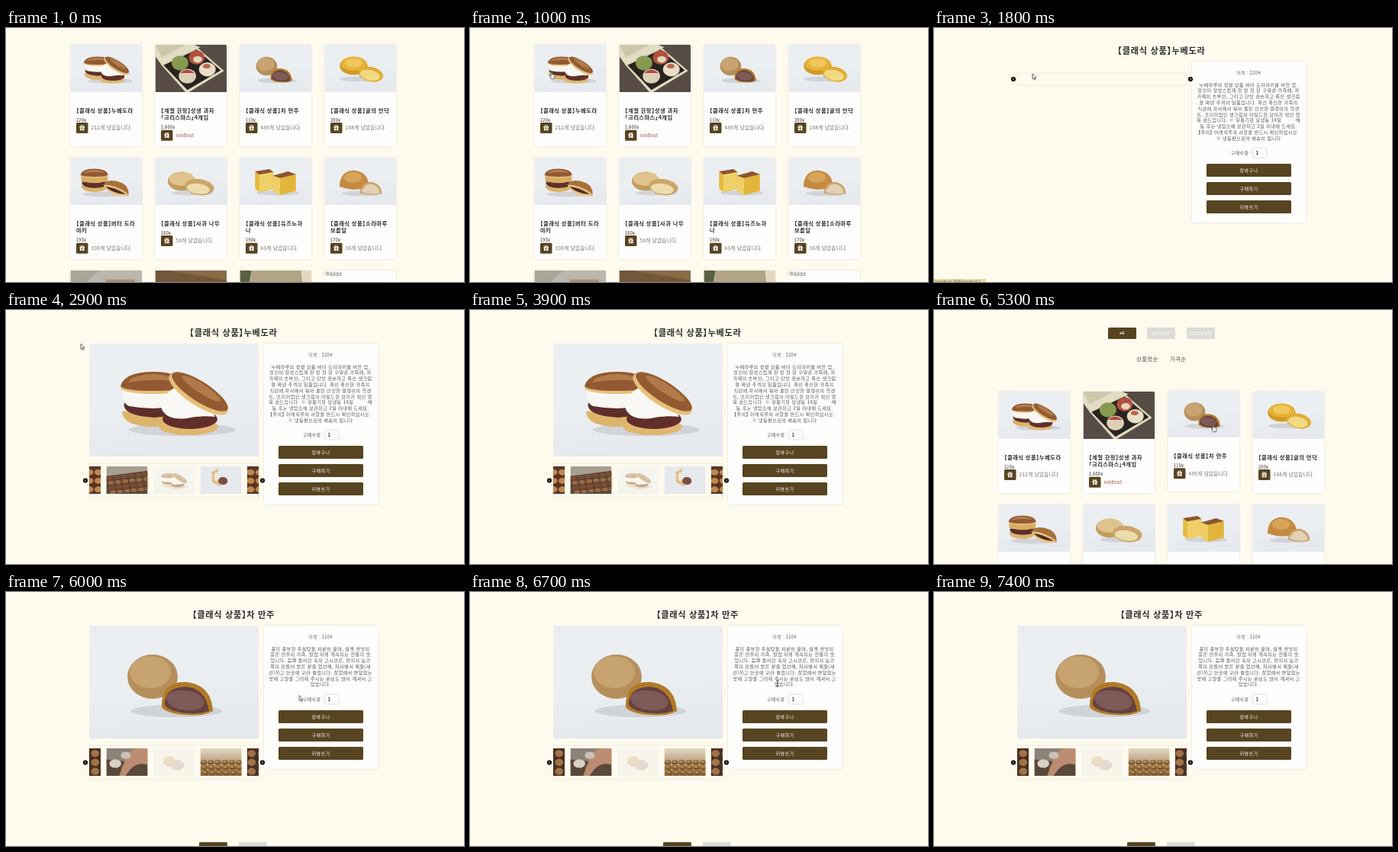
These frames come from a looping animation (600x333 px, 7500 ms). An HTML page:

```html
<!DOCTYPE html>
<html lang="ko">
<head>
<meta charset="utf-8">
<title>과자 상점</title>
<style>
html, body { margin: 0; width: 100%; height: 100%; overflow: hidden; background: #fefaee; }
svg { display: block; }
#stage { width: 600px; height: 333px; }
text {
  font-family: "Noto Sans CJK KR", "Noto Sans KR", "Noto Sans CJK JP", sans-serif;
  font-feature-settings: "halt"; letter-spacing: .055em; white-space: pre; fill: #555350;
}
.mid { text-anchor: middle; }
.bold { font-weight: 700; fill: #2f2e2c; }
.white { fill: #fff; }
.card, .panel { fill: #fffefd; filter: drop-shadow(0 .6px 1.2px #0002); }
.step { animation: 7.5s step-end infinite; }
.move { animation: 7.5s linear infinite; }
#list { animation-name: list; }
#detail0 { animation-name: first; }
#detail1 { animation-name: second; }
#empty0 { animation-name: firstEmpty; }
#empty1 { animation-name: secondEmpty; }
#full0 { animation-name: firstFull; }
#full1 { animation-name: secondFull; }
#status { animation-name: status; }
#card0 { animation-name: lift0; }
#card2 { animation-name: lift2; }
#cursor { animation-name: path; }
#arrow { animation-name: arrow; }
#hand { animation-name: hand; }
#beam { animation-name: beam; }

@keyframes list {
  0% { visibility: visible; transform: none; }
  22.66% { visibility: hidden; transform: none; }
  53.33% { visibility: visible; transform: translateY(85px); }
  73.33%, 100% { visibility: hidden; transform: translateY(85px); }
}
@keyframes first { 0% { visibility: hidden; } 22.66% { visibility: visible; } 53.33%, 100% { visibility: hidden; } }
@keyframes firstEmpty { 0% { visibility: hidden; } 22.66% { visibility: visible; } 27.99%, 100% { visibility: hidden; } }
@keyframes firstFull { 0% { visibility: hidden; } 27.99% { visibility: visible; } 53.33%, 100% { visibility: hidden; } }
@keyframes second { 0% { visibility: hidden; } 73.33%, 100% { visibility: visible; } }
@keyframes secondEmpty { 0% { visibility: hidden; } 73.33% { visibility: visible; } 77.33%, 100% { visibility: hidden; } }
@keyframes secondFull { 0% { visibility: hidden; } 77.33%, 100% { visibility: visible; } }
@keyframes status {
  0% { visibility: hidden; } 15.99% { visibility: visible; } 26.66% { visibility: hidden; }
  71.99% { visibility: visible; } 74.66%, 100% { visibility: hidden; }
}
@keyframes lift0 { 0%, 13.34% { transform: none; } 17.3%, 30% { transform: translateY(-5px); } 31%, 100% { transform: none; } }
@keyframes lift2 { 0%, 69.33% { transform: none; } 73.33%, 80% { transform: translateY(-5px); } 81%, 100% { transform: none; } }
@keyframes path {
  0%, 2% { transform: translate(300px, -14px); }
  13.2%, 14.5% { transform: translate(107px, 57.5px); }
  24%, 34.7% { transform: translate(129px, 60px); }
  43.3%, 44% { transform: translate(62px, 26px); }
  44.01%, 55.98% { transform: translate(-30px, 24px); }
  56% { transform: translate(76px, 24px); }
  69.33%, 73.33% { transform: translate(366px, 150.5px); }
  87%, 90% { transform: translate(403px, 120px); }
  94.7%, 100% { transform: translate(-20px, 140px); }
}
@keyframes arrow {
  0% { visibility: visible; } 12% { visibility: hidden; } 22.66% { visibility: visible; }
  68.5% { visibility: hidden; } 74% { visibility: visible; } 85% { visibility: hidden; } 91%, 100% { visibility: visible; }
}
@keyframes hand {
  0% { visibility: hidden; } 12% { visibility: visible; } 22.66% { visibility: hidden; }
  68.5% { visibility: visible; } 74%, 100% { visibility: hidden; }
}
@keyframes beam { 0% { visibility: hidden; } 85% { visibility: visible; } 91%, 100% { visibility: hidden; } }
</style>
</head>
<body>
<svg id="stage" viewBox="0 0 600 333"></svg>
<script>
const BROWN = '#574420';
const TYPE = 0.932; // glyph scale that makes room for the letter spacing

const rect = (x, y, w, h, fill, more = '') =>
  `<rect x="${x}" y="${y}" width="${w}" height="${h}" fill="${fill}" ${more}/>`;
const oval = (x, y, rx, ry, fill, turn = 0) =>
  `<ellipse cx="${x}" cy="${y}" rx="${rx}" ry="${ry}" fill="${fill}" transform="rotate(${turn} ${x} ${y})"/>`;
const path = (d, fill, more = '') => `<path d="${d}" fill="${fill}" ${more}/>`;
const label = (x, y, size, str, cls = '', more = '') =>
  `<text x="${x}" y="${y + size * 0.35}" font-size="${size * TYPE}" class="${cls}" ${more}>${str}</text>`;
const picture = (id, x, y, w, h, more = '') =>
  `<use href="#${id}" x="${x}" y="${y}" width="${w}" height="${h}" ${more}/>`;
const symbol = (id, body) =>
  `<symbol id="${id}" viewBox="0 0 222 148" preserveAspectRatio="xMidYMid slice">${body}</symbol>`;
const studio = (id, body) => symbol(id, rect(0, 0, 222, 148, 'url(#studio)') + body);
const grid = (cols, rows, draw) =>
  Array.from({ length: cols * rows }, (_, i) => draw(i % cols, Math.floor(i / cols))).join('');

const shadow = (x, y, rx) => oval(x, y, rx, 8, '#d0d3d7');

const stack = filling =>
  path('M43 89Q44 109 85 109Q125 108 126 89Z', '#deb36b') +
  path('M46 77H124Q131 94 85 97Q41 94 46 77Z', '#5d2f2b') +
  filling +
  oval(84, 58, 43, 8, '#e6c07a') +
  path('M41 56Q46 37 84 37Q122 37 127 56Q120 62 84 62Q48 62 41 56Z', '#925a32') +
  path('M50 51Q58 41 84 40Q108 41 116 50Q90 45 50 51Z', '#b17b4c');

const pictures = studio('dora',
  shadow(122, 113, 70) +
  stack(path('M44 60H125Q131 76 116 82Q84 88 52 82Q40 76 44 60Z', '#f8f6f2')) +
  oval(130, 109, 39, 11, '#e0b66e') +
  oval(132, 99, 36, 13, '#602f2a') +
  path('M95 86Q96 64 116 56Q152 70 165 96Q146 94 128 98Q102 101 95 86Z', '#faf8f5') +
  oval(143, 66, 45, 15, '#e6c07a', 33) +
  oval(145, 63, 43, 13, '#945b32', 33) +
  oval(147, 59, 30, 6, '#b07a4b', 33)) +
studio('butter',
  shadow(108, 114, 70) +
  `<g transform="translate(-10 -2)">${stack(path('M43 60H126V75Q84 88 43 75Z', '#d9ab62'))}</g>` +
  path('M104 80Q125 64 158 78Q184 90 180 118Q140 118 104 80Z', '#a8703a') +
  path('M102 84Q140 84 178 112Q178 122 160 120Q118 118 102 84Z', '#e8c687') +
  path('M108 90Q142 94 172 114Q134 114 108 90Z', '#542b22')) +
studio('manju',
  shadow(114, 112, 60) +
  oval(83, 67, 33, 29, '#b58f5b') + oval(80, 61, 27, 21, '#c7a46f') +
  path('M95 107Q94 73 126 74Q160 77 162 112Q150 119 124 117Q102 115 95 107Z', '#b07a28') +
  path('M99 104Q98 82 126 80Q152 82 157 112Q140 117 120 114Q103 111 99 104Z', '#65403f') +
  oval(126, 98, 25, 13, '#7d5958', 8)) +
studio('citrus',
  shadow(112, 107, 64) +
  oval(90, 66, 43, 28, '#cf9a26') + oval(90, 59, 40, 22, '#e6b237') + oval(90, 57, 27, 14, '#efc75d') +
  oval(143, 92, 39, 23, '#e0ad33', 12) + oval(141, 95, 31, 16, '#f2da83', 12)) +
studio('pastry',
  shadow(115, 110, 62) +
  oval(82, 74, 43, 29, '#c39b5d') + oval(82, 66, 39, 22, '#dfc38d') +
  oval(137, 92, 46, 25, '#caa566', 8) + oval(134, 97, 36, 16, '#ebdcae', 8)) +
studio('sponge',
  shadow(118, 110, 66) +
  path('M47 45L92 37L104 46V98L60 108L47 96Z', '#e5b93f') + path('M60 52L104 46V98L60 108Z', '#efcf68') +
  path('M47 43L92 36L104 45L60 53Z', '#8b5630') +
  path('M103 58L150 44L174 53V104L125 116L103 104Z', '#e2b53a') + path('M103 58L125 64V116L103 104Z', '#efcf68') +
  path('M103 56L150 43L174 52L125 64Z', '#8b5630')) +
studio('dome',
  shadow(114, 112, 62) +
  path('M46 90Q48 40 92 40Q136 44 138 92Q92 108 46 90Z', '#c48a40') + oval(88, 62, 28, 17, '#d6a358') +
  path('M110 110Q112 77 145 76Q176 82 178 112Q144 122 110 110Z', '#caa16a') +
  path('M115 108Q120 84 145 82Q170 90 172 111Q144 118 115 108Z', '#e2d0b4')) +
symbol('giftbox',
  rect(0, 0, 222, 148, '#574b45') +
  path('M0 0H120L140 8L22 66L0 36Z', '#e2dcc4') + path('M0 0H95L20 40Z', '#cfc7ac') +
  path('M18 62L130 8L214 82L98 152Z', '#e0d8bd') + path('M26 64L129 15L204 80L100 141Z', '#292420') +
  oval(77, 57, 26, 23, '#879a50') + oval(129, 40, 25, 22, '#b2503f') + oval(132, 46, 14, 10, '#e6d6bd') +
  oval(100, 98, 27, 23, '#ddcfb6') + path('M78 88Q99 68 121 88Z', '#b0483a') +
  oval(162, 77, 26, 22, '#e8dec8') + oval(160, 67, 12, 7, '#c0654e')) +
symbol('grey', rect(0, 0, 222, 148, '#bcb7ad') + path('M0 0H90L0 80Z', '#aaa59a') + rect(110, 28, 90, 30, '#a58d73')) +
symbol('wood', rect(0, 0, 222, 148, '#735739') + path('M40 0H222V30Z', '#8a6a47')) +
symbol('tray', rect(0, 0, 222, 148, '#b2a484') + path('M0 0H35L10 148H0Z', '#596044') + path('M190 0H222V148H205Z', '#e3d9c2')) +
symbol('racks', rect(0, 0, 222, 148, '#a89f93') + path('M0 52L222 24V148H0Z', '#5d4636') +
  grid(6, 4, (c, r) => oval(20 + c * 38 + r * 5, 62 + r * 26 - c * 4, 16, 10, r % 2 ? '#9c6a42' : '#7f4f31'))) +
symbol('griddle', rect(0, 0, 222, 148, '#5f3324') +
  grid(5, 3, (c, r) => oval(18 + c * 48, 32 + r * 46, 21, 16, '#bd8a4e'))) +
symbol('sweet', rect(0, 0, 222, 148, '#e6e9ee') + path('M62 30L98 10L90 60L110 112L64 84Z', '#dfc08c') +
  path('M76 38L95 30L92 80L76 74Z', '#f4e6d0') + oval(122, 79, 25, 21, '#7b4f40')) +
symbol('dough', rect(0, 0, 222, 148, '#8b8378') + path('M0 60L222 84V148H0Z', '#5a483b') +
  path('M70 148Q92 62 148 0H222V88Q166 70 126 116L102 148Z', '#bd8c70') +
  oval(48, 82, 32, 23, '#d8d2c7') + oval(105, 38, 28, 20, '#c9c0b3')) +
symbol('cubes', rect(0, 0, 222, 148, '#efece6') + oval(86, 70, 34, 29, '#cfb588') + oval(130, 91, 36, 29, '#c8a9a4')) +
symbol('baked', rect(0, 0, 222, 148, 'url(#warm)') +
  grid(6, 3, (c, r) => oval(18 + c * 38 + r * 4, 76 + r * 28, 17, 13, '#7d542a') + oval(16 + c * 38 + r * 4, 72 + r * 28, 11, 7, '#b5894f'))) +
symbol('oven', rect(0, 0, 222, 148, '#4a3023') +
  grid(4, 3, (c, r) => oval(24 + c * 56, 28 + r * 48, 22, 19, '#a27346')));

const gradients =
  `<linearGradient id="studio" x1="0" y1="0" x2=".25" y2="1">
    <stop offset="0" stop-color="#ebeef1"/><stop offset=".5" stop-color="#eceff2"/><stop offset="1" stop-color="#e6e9ed"/>
  </linearGradient>
  <linearGradient id="warm" x1="0" y1="0" x2="0" y2="1">
    <stop offset="0" stop-color="#e3d9c4"/><stop offset="1" stop-color="#8e693e"/>
  </linearGradient>`;

const KIND = '【클래식 상품】';
const goods = [
  ['dora', [KIND + '누베도라'], '220¥', 212],
  ['giftbox', ['【계절 한정】상생 과자', '「크리스마스」4개입'], '1,600¥', 0],
  ['manju', [KIND + '차 만주'], '110¥', 499],
  ['citrus', [KIND + '귤의 언덕'], '200¥', 148],
  ['butter', [KIND + '버터 도라', '야키'], '190¥', 330],
  ['pastry', [KIND + '사과 나무'], '160¥', 50],
  ['sponge', [KIND + '유즈노하', '나'], '190¥', 60],
  ['dome', [KIND + '소라마루', '보름달'], '170¥', 30],
];

const giftIcon = (x, y) =>
  `<g transform="translate(${x} ${y})">` + rect(-3.3, -1.6, 6.6, 1.7, '#fff') + rect(-2.8, .5, 5.6, 2.8, '#fff') +
  rect(-.4, -1.6, .8, 5, BROWN) +
  `<path d="M0-1.7Q-3-2-1.7-3.4Q-.6-3.6 0-1.7Q.6-3.6 1.7-3.4Q3-2 0-1.7" fill="none" stroke="#fff" stroke-width=".8"/></g>`;

function card([photo, lines, price, left], i) {
  const x = 84.5 + i % 4 * 111, y = 22 + Math.floor(i / 4) * 148;
  const low = y + (lines.length - 1) * 9.7;
  const stock = left
    ? label(x + 27, low + 109, 6.9, left + '개 남았습니다.', '', 'style="fill:#6d6a66"')
    : label(x + 27, low + 109, 6.5, 'soldout', '', 'style="fill:#9c3a34"');
  return `<g id="card${i}" class="move">` + rect(x, y, 93.5, 133, '#fff', 'class="card" rx="2"') +
    picture(photo, x, y, 93.5, 62, 'clip-path="inset(0 round 2px 2px 0 0)"') +
    lines.map((s, n) => label(x + 7.5, y + 86 + n * 9.7, 7.85, s, 'bold')).join('') +
    label(x + 7.5, low + 98.7, 5.9, price, '', 'style="fill:#222"') +
    rect(x + 7.5, low + 102, 15.5, 14, BROWN, 'rx="1.5"') + giftIcon(x + 15.2, low + 109) + stock + '</g>';
}

const tab = (x, str, fill, cls) =>
  rect(x, -62, 37, 15, fill, 'rx="1.5"') + label(x + 18.5, -54.6, 5.3, str, 'mid ' + cls);

const thirdRow = ['grey', 'wood', 'tray'].map((id, i) =>
  rect(84.5 + i * 111, 318, 93.5, 133, '#fff', 'class="card" rx="2"') + picture(id, 84.5 + i * 111, 318, 93.5, 62)).join('') +
  rect(417.5, 318, 93.5, 133, '#fff', 'class="card" rx="2"') +
  rect(418.5, 319.5, 5, 5, '#b9c7b2') + label(424, 322.5, 6.4, 'dddd');

const list = '<g id="list" class="step">' +
  tab(228, 'all', BROWN, 'bold white') + tab(279, '클래식상품', '#dcdbd7', 'white') + tab(331, '시즌한정상품', '#dcdbd7', 'white') +
  label(265, -21, 7.9, '상품명순') + label(309, -21, 7.9, '가격순') +
  goods.map(card).join('') + thirdRow + '</g>';

const details = [
  {
    good: goods[0], thumbs: ['griddle', 'racks', 'dora', 'sweet', 'griddle'],
    text: ['누베마루의 정평 상품 버터 도라야키를 버전 업.', '장인이 정성스럽게 한 장 한 장 구워낸 가죽에, 자',
      '가제의 츠부안, 그리고 단맛 겸손하고 폭신 생크림', '을 짜낸 추격의 일품입니다. 폭신 폭신한 가죽의',
      '식감에 자사에서 볶아 올린 신선한 알갱이의 악센', '트, 프리미엄인 생크림의 마일드한 감미가 섞인 행',
      '복 샌드입니다. ※ 유통기한 요냉동 14일         해', '동 후는 냉암소에 보관하고 2일 이내에 드세요.',
      '【주의】 아래의주의 사항을 반드시 확인하십시오.', '※ 냉동편으로의 배송이 됩니다'],
  },
  {
    good: goods[2], thumbs: ['oven', 'dough', 'cubes', 'baked', 'oven'],
    text: ['풍미 풍부한 흑설탕을 차분히 끓여, 살짝 짠맛이', '묻은 만쥬의 가죽. 창업 이래 계속되는 전통의 맛',
      '입니다. 듬뿍 들어간 속의 고시안은, 현지의 농가', '쪽이 만들어 받은 팥을 엄선해, 자사에서 제철(새',
      '안)하고 안코에 모아 올립니다. 창업에서 변함없는', '맛에 고향을 그리워 주시는 손님도 많이 계셔서 고', '맙습니다.'],
  },
];

const knob = (x, y, dir) => `<circle cx="${x}" cy="${y}" r="3.1" fill="#0b0a08"/>` +
  `<path d="M${x - dir * .6} ${y - 1.4}l${dir * 1.4} 1.4l${-dir * 1.4} 1.4" fill="none" stroke="#fff" stroke-width=".8"/>`;
const slider = (y, h) => rect(109, y, 222, h, 'none', 'stroke="#efe8d6" stroke-width=".8"') +
  knob(104, y + h / 2, -1) + knob(336, y + h / 2, 1);
const lowerTabs = y => rect(253, y, 37, 15, BROWN, 'rx="1.5"') + rect(305, y, 37, 15, '#dcdbd7', 'rx="1.5"');

function detail({ good, thumbs, text }, i) {
  const end = Math.round(177 + text.length * 7.8);
  const button = (str, n) => rect(357, end - 77 + n * 24, 111, 17, BROWN, 'rx="1.5"') +
    label(412.5, end - 68.6 + n * 24, 6.6, str, 'mid white');
  const strip = thumbs.map((id, n) => picture(id, 70 + n * 61.5, 205, 54, 36, n === 2 ? 'opacity=".4"' : '')).join('');
  return `<g id="detail${i}" class="step">` +
    label(298, 29.7, 12.1, good[1][0], 'mid bold') +
    rect(338, 44, 149, end - 44, '#fff', 'class="panel" rx="2.5"') +
    label(412, 59, 6.4, '가격 : ' + good[2], 'mid') +
    text.map((s, n) => label(412, 74.2 + n * 7.8, 6.65, s, 'mid')).join('') +
    label(389, end - 91.5, 6.4, '구매수량 :') +
    rect(418, end - 98, 18, 13, '#fff', 'rx="1.5" stroke="#d5d5d5" stroke-width=".8"') + label(421.5, end - 91.5, 6.2, '1', 'bold') +
    ['장바구니', '구매하기', '리뷰쓰기'].map(button).join('') +
    `<g id="empty${i}" class="step">${slider(59, 16)}${lowerTabs(end + 83)}</g>` +
    `<g id="full${i}" class="step">${picture(good[0], 109, 44, 222, 148)}${slider(201, 45)}` +
    `<g clip-path="url(#strip)">${strip}</g>${lowerTabs(Math.max(end, 245) + 83)}</g></g>`;
}

const status = '<g id="status" class="step">' + rect(0, 329, 68, 5, '#e6dca0') +
  label(1, 332.5, 5, 'localhost:3000/product/1') + '</g>';

const ink = 'stroke="#222" stroke-width=".7" stroke-linejoin="round"';
const cursor = '<g id="cursor" class="move">' +
  `<g id="arrow" class="step">${path('M0 0V7L1.6 5.6L2.7 8L3.8 7.5L2.8 5.2H5Z', '#fff', ink)}</g>` +
  `<g id="hand" class="step">${path('M-.8.6Q0-.6.8.6V3.4L3.6 4Q4.4 4.3 4.2 5.4L3.6 8.8H-.6L-2.6 5.4Q-2.6 4.4-.8 5.4Z', '#fff', ink)}</g>` +
  `<g id="beam" class="step"><path d="M-1.6-4H1.6M0-4V4M-1.6 4H1.6" fill="none" stroke="#222" stroke-width=".8"/></g></g>`;

document.getElementById('stage').innerHTML =
  `<defs>${gradients}<clipPath id="strip">${rect(109, 201, 222, 45, '#000')}</clipPath>${pictures}</defs>` +
  rect(0, 0, 600, 333, '#fefaee') + list + details.map(detail).join('') + status + cursor;
</script>
</body>
</html>
```
